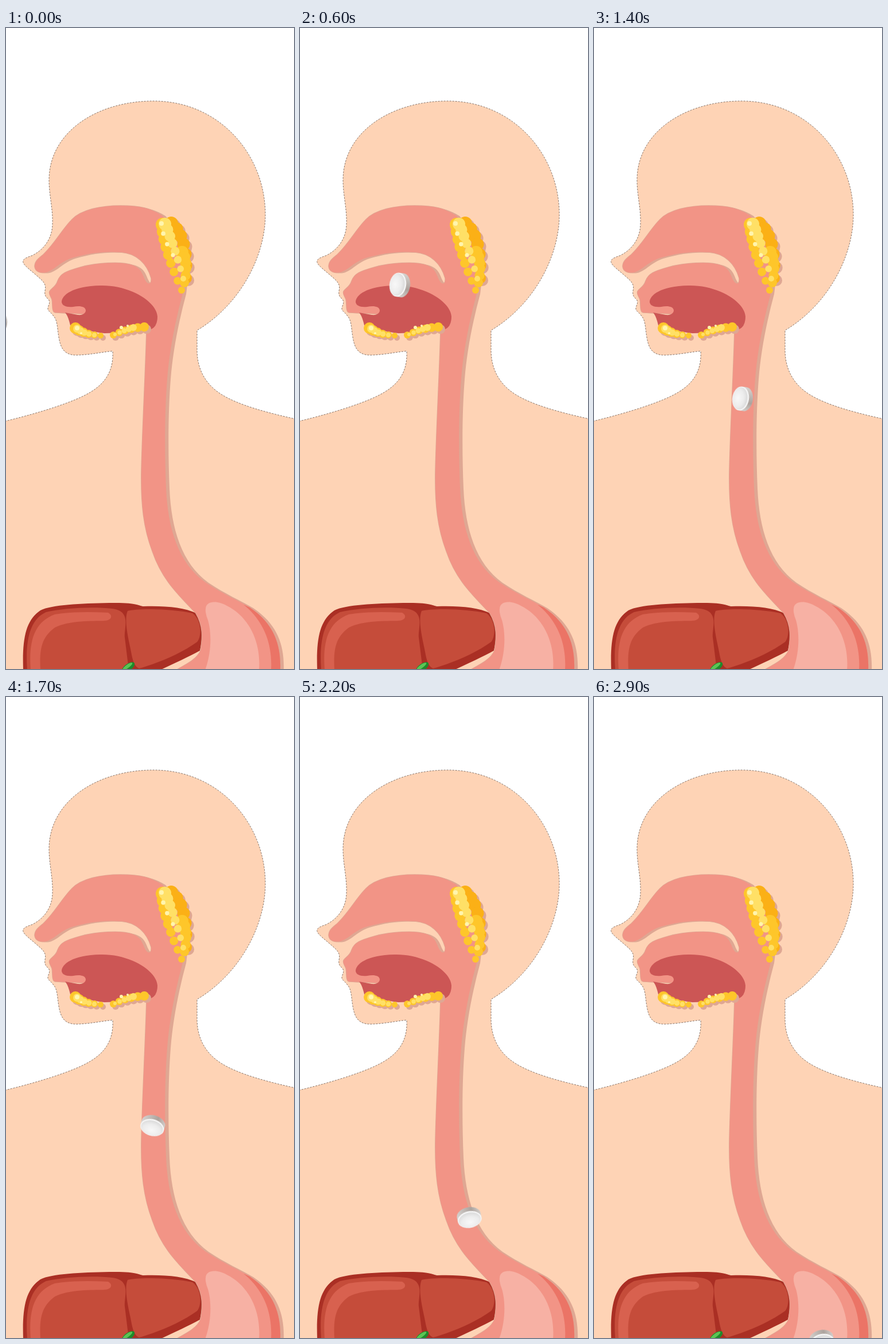
These frames come from a looping animation (502x1115 px, 3 s). An HTML page:

```html
<!DOCTYPE html>
<html lang="en">
<head>
<meta charset="utf-8">
<title>Swallowing a tablet</title>
<style>
  html, body { margin: 0; width: 100%; height: 100%; overflow: hidden; background: #fff; }
  svg { display: block; width: 502px; height: 1115px; }
  .body { fill: #fed3b5; stroke: #6b5a50; stroke-width: .8; stroke-dasharray: 3 2; }
  .tract { fill: #f29486; stroke: #dfa793; stroke-width: 1.6; paint-order: stroke; }
  .shadow { fill: #dfa793; }
  .liver { fill: #aa2f24; }
  .lobe { fill: #c54c3a; }
</style>
</head>
<body>
<svg viewBox="0 0 502 1115" xmlns="http://www.w3.org/2000/svg">
  <defs>
    <linearGradient id="side" x2="0" y2="1">
      <stop stop-color="#d6d3d0"/>
      <stop offset=".65" stop-color="#aca39d"/>
      <stop offset="1" stop-color="#d2cecb"/>
    </linearGradient>
    <radialGradient id="face" cx=".36" r=".65">
      <stop stop-color="#f8f8f8"/>
      <stop offset=".6" stop-color="#ececec"/>
      <stop offset="1" stop-color="#d9d9d9"/>
    </radialGradient>
    <!-- nose, throat, gullet, stomach, back up to the mouth and palate -->
    <path id="tract" d="M50 415 C50 405 58 400 65 394 C85 375 98 350 115 333
      S165 309 200 309 S252 314 272 326 L318 380 L308 462
      C295 510 285 560 281 610 S276 730 279 800 S300 930 347 964
      C375 983 405 996 425 1008 C465 1035 480 1070 478 1117 L296 1117
      C314 1107 333 1098 339 1083 C343 1060 344 1040 331 1018
      C300 985 272 960 255 910 C240 870 235 830 236 770
      C238 690 243 600 245 527 L200 500 L86 495
      C79 494 82 480 80 472 C78 466 74 463 76 458 C80 452 87 450 90 440
      C95 427 105 423 130 416 S200 405 222 413
      C240 420 238 435 246 443 C250 446 254 445 253 435
      C246 410 228 392 200 390 S145 391 115 400
      C95 406 85 421 70 425 C60 427 51 424 50 415 Z"/>
  </defs>

  <path class="body" d="M-2 684 C40 674 100 657 135 640 S188 600 186 562
    C165 564 150 568 125 569 S95 555 92 538 C89 520 90 508 82 500
    C78 494 72 492 73 487 C74 481 78 478 74 472 C68 467 67 463 68 457
    C71 445 64 440 55 432 C45 423 32 414 30 408 C28 402 36 399 45 396
    C66 386 81 366 81 340 C82 315 75 290 75 265 C75 180 160 127 257 127
    C372 127 452 220 452 325 C452 395 410 480 333 526 L333 560
    C333 590 345 618 375 637 S455 669 504 680 V1117 H-2 Z"/>

  <path class="liver" d="M30 1117 C28 1060 35 1030 60 1013 C80 1003 130 1001 180 1000
    S230 1005 240 1006 C280 1005 310 1008 332 1018
    C345 1035 343 1060 338 1083 C318 1094 290 1107 268 1117 Z"/>
  <path class="lobe" d="M37 1117 C33 1065 42 1028 70 1016 C100 1009 150 1006 185 1010
    S205 1045 207 1060 L214 1117 Z"/>
  <path fill="#d8614f" d="M43 1117 C39 1065 50 1033 85 1020 Q120 1014 178 1017
    C187 1022 184 1030 172 1031 C150 1032 110 1030 85 1043 C62 1060 58 1080 60 1117 Z"/>
  <path class="lobe" d="M212 1014 C230 1009 290 1010 325 1018 C342 1030 341 1060 333 1068
    C305 1088 265 1105 232 1114 C222 1110 220 1095 217 1080 S205 1030 212 1014 Z"/>
  <g transform="translate(213 1112) rotate(-35)">
    <ellipse rx="13" ry="6" fill="#1f8a2c"/>
    <ellipse cy="-2" rx="10" ry="3" fill="#5cc455"/>
  </g>

  <use href="#tract" class="shadow" x="6" y="1"/>
  <use href="#tract" class="tract"/>
  <path fill="#eb7466" d="M414 1003 L425 1008 C465 1035 480 1070 478 1117 H462
    C465 1070 448 1030 414 1003 Z"/>
  <path fill="#f7b1a4" d="M348 1010 C349 995 370 996 385 1005 C425 1025 445 1070 441 1117
    H347 C359 1085 358 1050 352 1030 Q347 1018 348 1010 Z"/>
  <path fill="#cc5655" d="M97 477 C97 465 115 449 165 448 S262 475 264 502
    Q264 523 247 526 C215 528 190 531 172 531 C145 528 115 520 112 517
    Q108 500 103 495 L125 499 C134 500 139 496 139 491 C138 484 128 483 117 485
    C105 486 98 483 97 477 Z"/>

  <g id="glands"></g>

  <g id="pill">
    <path fill="url(#side)" d="M-4 -21 H4 A14 21 0 0 1 4 21 H-4 Z"/>
    <ellipse cx="-3.5" rx="14.5" ry="21" fill="#f7f7f7"/>
    <ellipse cx="-4.5" rx="13" ry="19.5" fill="url(#face)"/>
  </g>
</svg>
<script>
  const SHADOW = '#dfa793', ORANGE = '#fbb016', YELLOW = '#fec62a', LIGHT = '#ffe066', SHINE = '#fff5ae';
  const glands = document.getElementById('glands');
  const mix = (a, b, p) => a + (b - a) * p;

  // A row of circles along a curve, their radius going from r0 to r1.
  function row(fill, count, [r0, r1], a, b, c, shift = 0) {
    const bend = (i, p) => mix(mix(a[i], b[i], p), mix(b[i], c[i], p), p) + shift;
    let dots = '';
    for (let n = 0; n < count; n++) {
      const p = n / (count - 1);
      dots += `<circle cx="${bend(0, p)}" cy="${bend(1, p)}" r="${mix(r0, r1, p)}"/>`;
    }
    glands.insertAdjacentHTML('beforeend', `<g fill="${fill}">${dots}</g>`);
  }

  function shadedRow(fill, ...shape) {
    row(SHADOW, ...shape, 4);
    row(fill, ...shape);
  }

  // behind the jaw
  shadedRow(ORANGE, 7, [12, 10], [288, 340], [318, 365], [314, 435]);
  row(YELLOW, 6, [11, 8], [307, 390], [318, 410], [311, 443]);
  row(YELLOW, 9, [12, 6], [273, 342], [276, 390], [306, 456]);
  row(LIGHT, 8, [11, 5], [277, 341], [292, 374], [309, 436]);
  row(SHINE, 4, [4, 3.5], [271, 340], [273, 366], [291, 395]);
  // under the tongue
  shadedRow(YELLOW, 6, [10, 5], [121, 522], [136, 533], [165, 535]);
  row(LIGHT, 5, [7, 4], [124, 523], [134, 531], [154, 534]);
  row(SHINE, 2, [4, 2], [124, 522], [127, 526], [131, 531]);
  shadedRow(YELLOW, 6, [6, 8], [187, 534], [212, 522], [241, 520]);
  row(LIGHT, 5, [3, 6], [190, 533], [206, 526], [222, 521]);
  row(SHINE, 2, [3, 2], [201, 521], [206, 520], [212, 518]);

  // Places the pill passes: step, x, y
  const STOPS = [
    [0, -16, 513], [6, 174, 447], [10, 270.5, 509.5], [14, 259, 645],
    [19, 262.5, 811], [25, 337, 998], [29, 397, 1119]
  ];
  const STEPS = 30, DURATION = 3000;

  function speed(i, axis) {
    const a = STOPS[Math.max(0, i - 1)], b = STOPS[Math.min(STOPS.length - 1, i + 1)];
    return (b[axis] - a[axis]) / (b[0] - a[0]);
  }

  // Smooth curve through the stops
  function place(step, axis) {
    const i = Math.max(1, STOPS.findIndex(s => s[0] >= step));
    const a = STOPS[i - 1], b = STOPS[i], span = b[0] - a[0];
    const p = (step - a[0]) / span, q = 1 - p;
    return mix(a[axis], b[axis], p * p * (3 - 2 * p))
      + span * p * q * (q * speed(i - 1, axis) - p * speed(i, axis));
  }

  function pose(step) {
    const turn = Math.min(1, Math.max(0, (step - 14) / 4));
    return `translate(${place(step, 1)}px, ${place(step, 2)}px) rotate(${mix(8, -102, turn)}deg)`;
  }

  const frames = Array.from({ length: STEPS }, (_, i) => ({
    offset: Math.max(0, i / STEPS - 1e-5),
    transform: pose(i),
    easing: 'steps(1, end)'
  }));
  frames.push({ offset: 1, transform: pose(STEPS - 1) });
  document.getElementById('pill').animate(frames, { duration: DURATION, iterations: Infinity });
</script>
</body>
</html>
```
